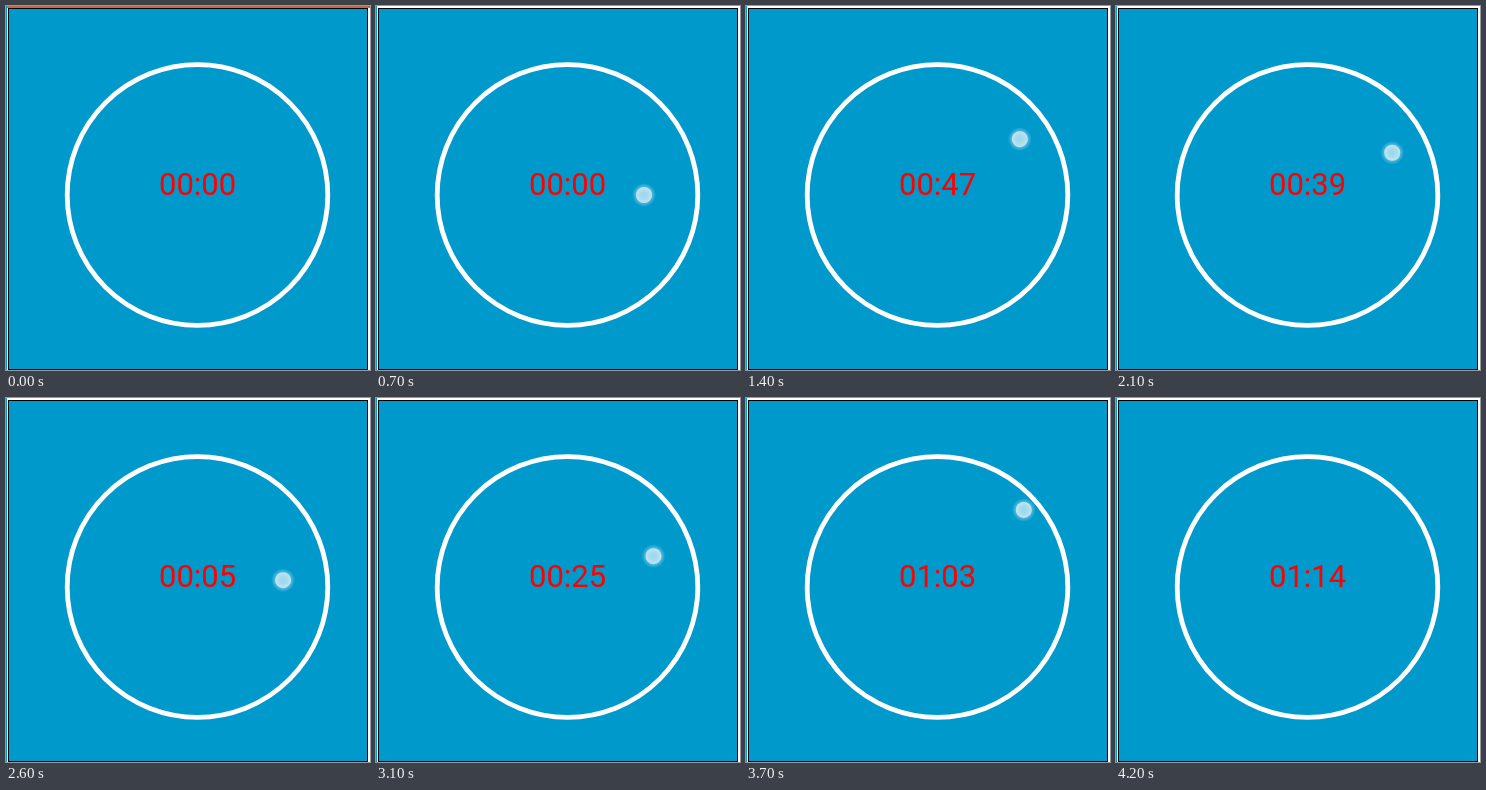
An HTML page for the animation above (4.9 s loop, 364x364 px).

```html
<!DOCTYPE html>
<html lang="en">
<head>
<meta charset="utf-8">
<title>Touch timer</title>
<style>
  html, body { margin: 0; width: 100%; height: 100%; overflow: hidden; }
  svg { display: block; width: 100%; height: 100%; }
  text { font: 31px Roboto, sans-serif; fill: #f00; }
</style>
</head>
<body>
<svg viewBox="0 0 364 364">
  <defs>
    <radialGradient id="glow">
      <stop offset=".66" stop-color="#fff" stop-opacity=".32"/>
      <stop offset="1" stop-color="#fff" stop-opacity="0"/>
    </radialGradient>
    <radialGradient id="core">
      <stop offset="0" stop-color="#9bd6ea"/>
      <stop offset=".5" stop-color="#a7dbed"/>
      <stop offset="1" stop-color="#c2e5f2"/>
    </radialGradient>
  </defs>
  <rect width="364" height="364" fill="#fff"/>
  <rect width="1" height="364" fill="#0099cc"/>
  <rect id="strip" x="1" width="363" height="2" fill="#c0694e"/>
  <rect x="2.5" y="2.5" width="359" height="361" fill="#0099cc" stroke="#000"/>
  <circle cx="191.5" cy="189" r="130.3" fill="none" stroke="#fff" stroke-width="4.8"/>
  <text id="clock" x="153" y="189">00:00</text>
  <g id="touch">
    <circle r="12" fill="url(#glow)"/>
    <circle r="8" fill="url(#core)"/>
  </g>
</svg>
<script>
  const LOOP = 4900, STEP = 100, PRESS = 700, RELEASE = 4200;

  // Each drag eases the finger's height and the clock's seconds between two values
  const drags = [
    { start: 750, end: 1700, y: [189, 124], seconds: [0, 54.5] },
    { start: 1950, end: 2800, y: [131, 187], seconds: [54.5, 0] },
    { start: 2950, end: 3500, y: [187, 118], seconds: [0, 59] },
    { start: 3620, end: 4100, y: [121, 87], seconds: [59, 74] },
  ];

  const $ = id => document.getElementById(id);
  const strip = $("strip"), clock = $("clock"), touch = $("touch");
  const pad = n => String(n).padStart(2, "0");
  const show = (node, on) => node.setAttribute("visibility", on ? "visible" : "hidden");
  const clamp = v => Math.min(1, Math.max(0, v));
  const easeOut = p => 1 - (1 - p) ** 1.7;
  const mix = ([from, to], k) => from + (to - from) * k;

  function draw(now) {
    const time = Math.floor(now % LOOP / STEP) * STEP;
    const drag = drags.findLast(d => d.start <= time) || drags[0];
    const k = easeOut(clamp((time - drag.start) / (drag.end - drag.start)));

    const seconds = Math.round(mix(drag.seconds, k));
    clock.textContent = pad(Math.floor(seconds / 60)) + ":" + pad(seconds % 60);

    // The finger drifts right and settles
    const x = 278 - 10 * Math.exp((PRESS - time) / 800);
    touch.setAttribute("transform", `translate(${x} ${mix(drag.y, k)})`);
    show(touch, time >= PRESS && time < RELEASE);
    show(strip, time < PRESS);
  }

  const start = performance.now();
  function tick() {
    draw(performance.now() - start);
    requestAnimationFrame(tick);
  }
  tick();
</script>
</body>
</html>
```
